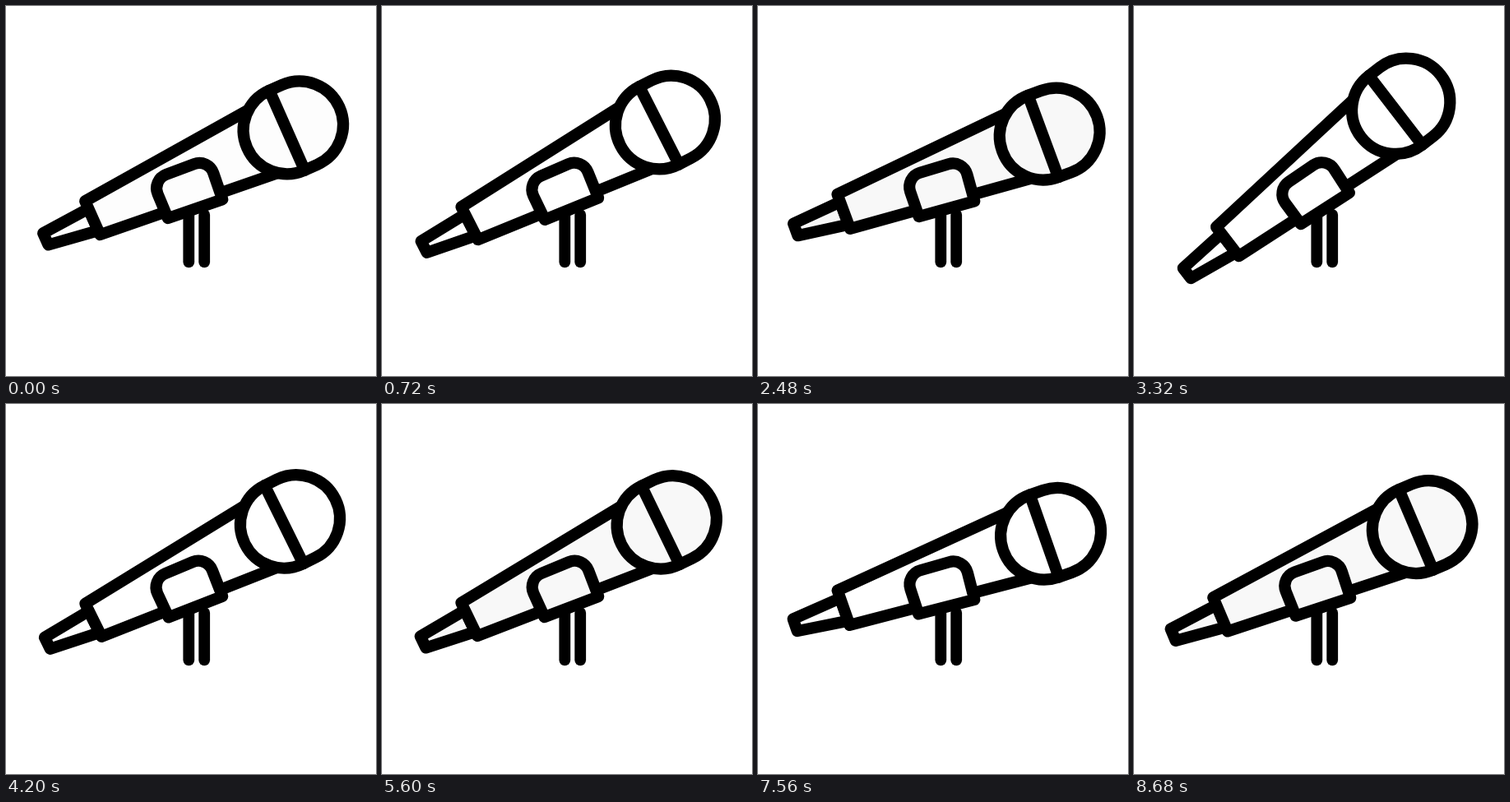
Animation of 450x450 px, one loop 8.72 s. Source, as an HTML page with a canvas:

```html
<!DOCTYPE html>
<html lang="en">
<head>
<meta charset="utf-8">
<title>Microphone</title>
<style>
  html, body { margin: 0; width: 100%; height: 100%; overflow: hidden; background: #fff; }
  canvas { display: block; width: 450px; height: 450px; }
</style>
</head>
<body>
<canvas id="stage" width="450" height="450"></canvas>
<script>
const ctx = document.getElementById('stage').getContext('2d');
const LOOP = 8720, STEP = 40;
const RAD = Math.PI / 180;
const REST = 23.9; // tilt of the microphone axis at time 0
const STROKE = 14.2;

// Turning points of the swing: [time, degrees upward]
const TURNS = [
  [540, 6.8], [900, -0.7], [1880, -4.8], [2300, -4.8], [3420, 14.1],
  [4740, -4.2], [5800, 2.5], [6340, 0.1], [6950, 3], [8040, -9.8]
];

// Sine easing from each turning point to the next, across the loop
function swing(t) {
  if (t < TURNS[0][0]) t += LOOP;
  const i = TURNS.findLastIndex(k => k[0] <= t);
  const [t0, a] = TURNS[i];
  const [next, b] = TURNS[(i + 1) % TURNS.length];
  const t1 = next > t0 ? next : next + LOOP;
  const s = (t - t0) / (t1 - t0);
  return a + (b - a) * (1 - Math.cos(Math.PI * s)) / 2;
}

// The panels dim slightly in a slow pulse
function grey(t) {
  const pulse = Math.cos(2 * Math.PI * (t - 2480) / 3100);
  return Math.round(255 - 7 * Math.max(0, pulse));
}

function paint() {
  ctx.closePath();
  ctx.fill();
  ctx.stroke();
}

// Tapered section: left and right x, then top and bottom at each side
function taper(x0, x1, top0, bottom0, top1, bottom1) {
  ctx.beginPath();
  ctx.moveTo(x0, top0);
  ctx.lineTo(x1, top1);
  ctx.lineTo(x1, bottom1);
  ctx.lineTo(x0, bottom0);
  paint();
}

function line(x0, y0, x1, y1) {
  ctx.beginPath();
  ctx.moveTo(x0, y0);
  ctx.lineTo(x1, y1);
  ctx.stroke();
}

function drawHead() {
  const x = 137.8, y = -32.8, r = 53;
  ctx.beginPath();
  ctx.arc(x + 16.7, y, r, -Math.PI / 2, Math.PI / 2);
  ctx.arc(x, y, r, Math.PI / 2, Math.PI * 1.5);
  paint();
  line(x, y - r, x, y + r);
}

function drawClip() {
  const left = -37.3, right = 33, bottom = 9.5, round = 18;
  ctx.beginPath();
  ctx.moveTo(left, bottom);
  ctx.arcTo(left - 3.2, -41, right, -43, round);
  ctx.arcTo(right, -43, right, bottom, round);
  ctx.lineTo(right, bottom);
  paint();
}

function draw(t) {
  const g = grey(t);
  ctx.fillStyle = '#fff';
  ctx.fillRect(0, 0, 450, 450);
  ctx.strokeStyle = '#000';
  ctx.lineCap = ctx.lineJoin = 'round';

  ctx.lineWidth = 13.8;
  for (const x of [222.3, 241.2]) line(x, 254, x, 311.3);

  ctx.save();
  ctx.translate(229, 237);
  ctx.rotate(-(REST + swing(t)) * RAD);
  ctx.lineWidth = STROKE;
  ctx.fillStyle = `rgb(${g},${g},${g})`;
  taper(-184, -121.5, -38.5, -23, -43.5, -14.3);
  taper(-121.5, 111, -53.5, -8.8, -75, 10.5);
  drawHead();
  ctx.rotate(4.9 * RAD);
  drawClip();
  ctx.restore();
}

function tick() {
  const t = performance.now() % LOOP;
  draw(Math.floor(t / STEP) * STEP);
  requestAnimationFrame(tick);
}
tick();
</script>
</body>
</html>
```
